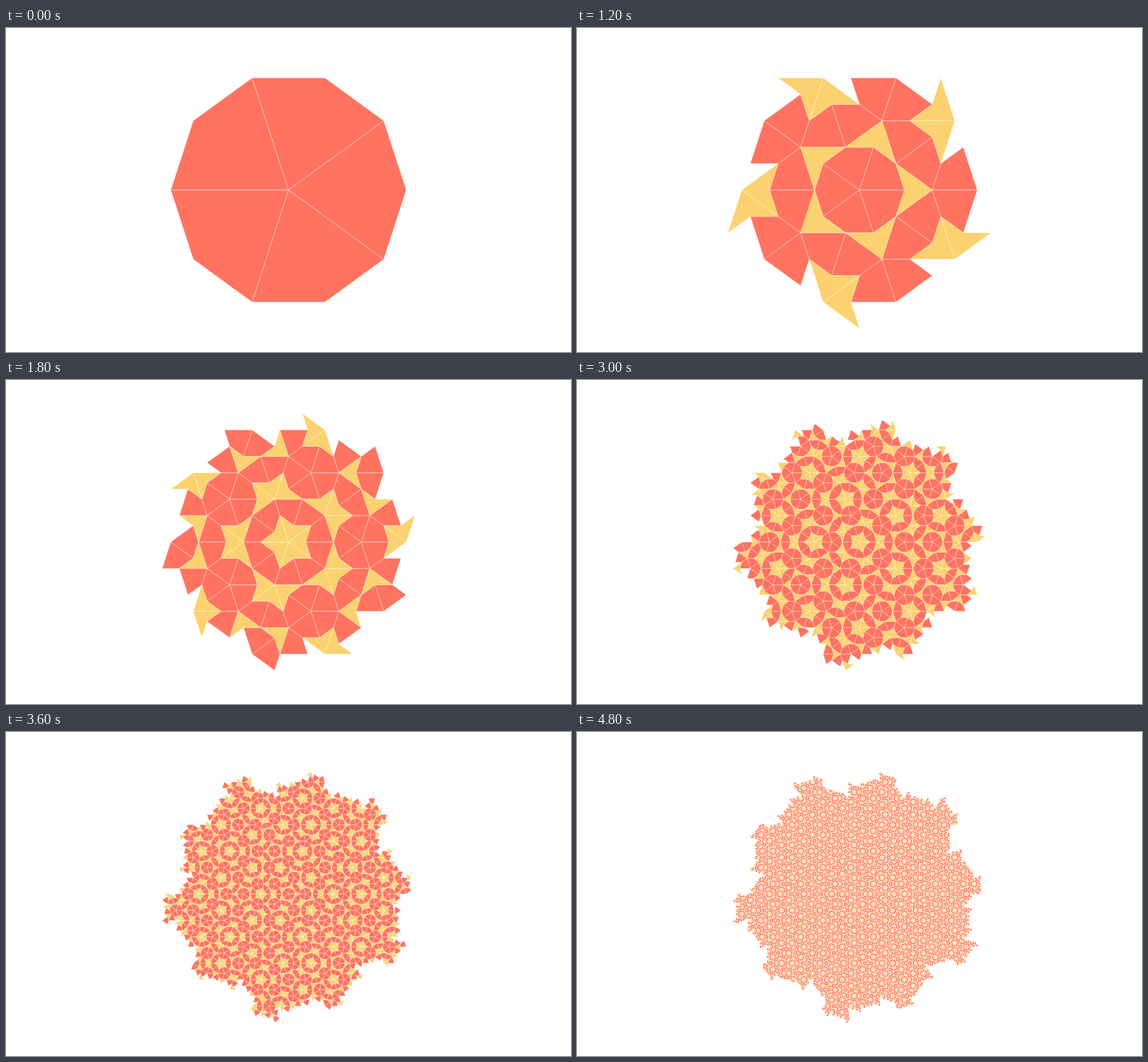
An HTML page with a canvas for the animation above (5400 ms loop, 960 px wide and 550 px high).

```html
<!DOCTYPE html>
<html lang="en">
<head>
<meta charset="utf-8">
<title>Kites and darts</title>
<style>
  html, body { margin: 0; width: 100%; height: 100%; overflow: hidden; background: #fff; }
  canvas { display: block; }
</style>
</head>
<body>
<canvas id="stage" width="960" height="550"></canvas>
<script>
const ctx = document.getElementById('stage').getContext('2d');
const PHI = (1 + Math.sqrt(5)) / 2;
const T = Math.PI / 5; // 36 degrees
const STEP = 600, GENERATIONS = 9, RADIUS = 200;
const KITE_COLOR = '#ff7360', DART_COLOR = '#fbd26f';

const polar = (x, y, angle, r) => [x + r * Math.cos(angle), y + r * Math.sin(angle)];

// A tile is placed by its 72-degree tip and the direction of its axis.
const tile = (isKite, [x, y], angle) => ({ isKite, x, y, angle });

// Every tile keeps just one of the two darts on its long edges;
// its neighbour supplies the other one.
function split({ isKite, x, y, angle }, size) {
  const wing = side => polar(x, y, angle + side * T, size);
  return isKite
    ? [
        tile(true, wing(1), angle + 7 * T),
        tile(true, wing(-1), angle - 7 * T),
        tile(false, [x, y], angle + T)
      ]
    : [
        tile(true, [x, y], angle),
        tile(false, wing(-1), angle - T + Math.PI)
      ];
}

function addOutline(path, { isKite, x, y, angle }, size) {
  path.moveTo(x, y);
  path.lineTo(...polar(x, y, angle - T, size));
  path.lineTo(...polar(x, y, angle, isKite ? size : size / PHI));
  path.lineTo(...polar(x, y, angle + T, size));
  path.closePath();
}

function buildPaths(tiles, size) {
  const kites = new Path2D(), darts = new Path2D();
  for (const t of tiles) addOutline(t.isKite ? kites : darts, t, size);
  return [[kites, KITE_COLOR], [darts, DART_COLOR]];
}

const generations = [];
let tiles = Array.from({ length: 5 }, (_, i) => tile(true, [480, 275], 2 * T * i));
for (let n = 0, size = RADIUS; n < GENERATIONS; n++, size /= PHI) {
  generations.push(buildPaths(tiles, size));
  tiles = tiles.flatMap(t => split(t, size));
}

function draw(paths) {
  ctx.fillStyle = '#fff';
  ctx.fillRect(0, 0, 960, 550);
  ctx.strokeStyle = '#fff';
  ctx.lineWidth = 0.4;
  for (const [path, color] of paths) {
    ctx.fillStyle = color;
    ctx.fill(path);
    ctx.stroke(path);
  }
}

let shown = -1;
function frame() {
  const n = Math.floor(performance.now() / STEP) % GENERATIONS;
  if (n !== shown) draw(generations[shown = n]);
  requestAnimationFrame(frame);
}
frame();
</script>
</body>
</html>
```
